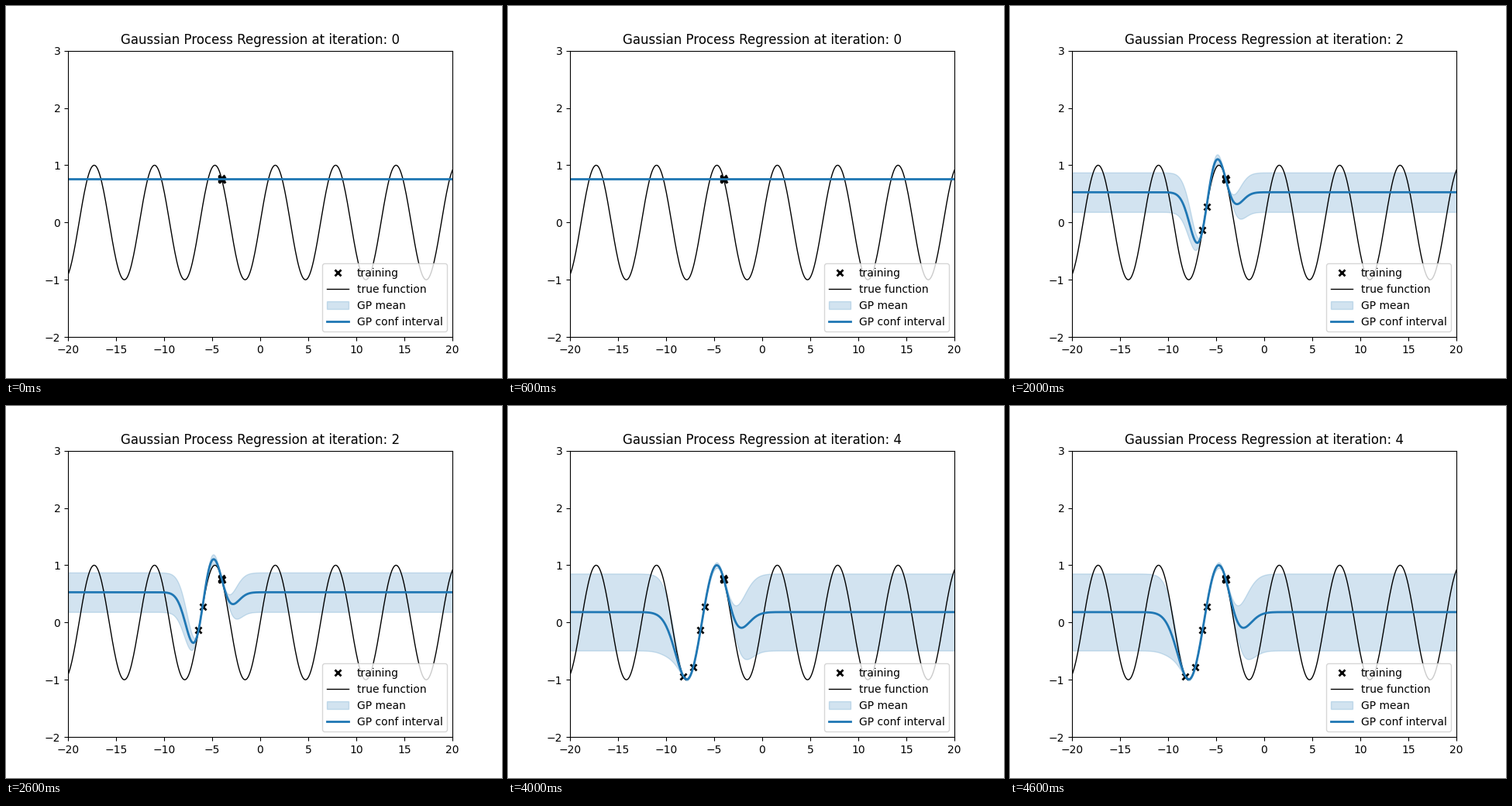
Recreate the animation shown at these times as a matplotlib script. Size 640 by 480 pixels, loop 5000 ms.

```python
import matplotlib.pyplot as plt
import numpy as np
from matplotlib.animation import FuncAnimation

# Four tightly packed starting samples, then one new sample per iteration
START = -4 + np.array([-0.02, -0.007, 0.007, 0.02])
ADDED = np.array([-6.0, -6.42, -7.17, -8.2])
LENGTH_SCALES = [1e-4, 0.8, 0.99, 1.26, 1.32]
NOISE = 3e-5

grid = np.linspace(-20, 20, 400)


def rbf(a, b, scale):
    return np.exp(-0.5 * ((a[:, None] - b[None, :]) / scale) ** 2)


def gp_predict(x, y, scale):
    """Posterior mean and deviation of a GP fitted to normalised targets."""
    mu, sd = y.mean(), y.std()
    gram = rbf(x, x, scale) + NOISE * np.eye(len(x))
    cross = rbf(grid, x, scale)
    mean = cross @ np.linalg.solve(gram, (y - mu) / sd)
    var = 1 - np.sum(cross * np.linalg.solve(gram, cross.T).T, axis=1)
    return mu + sd * mean, sd * np.sqrt(np.clip(var, 0, None))


fig, ax = plt.subplots(figsize=(6.4, 4.8), dpi=100)
points, = ax.plot([], [], "kx", mew=2, label="training")
ax.plot(grid, np.sin(grid), "k", lw=1, label="true function")
band = ax.fill_between(grid, grid * 0, grid * 0, color="C0", alpha=0.2,
                       label="GP mean")
curve, = ax.plot([], [], "C0", lw=2, label="GP conf interval")
ax.set_xlim(-20, 20)
ax.set_ylim(-2, 3)
ax.legend(loc="lower right")
title = ax.set_title("")


def update(step):
    x = np.concatenate([START, ADDED[:step]])
    y = np.sin(x)
    mean, dev = gp_predict(x, y, LENGTH_SCALES[step])
    points.set_data(x, y)
    curve.set_data(grid, mean)
    outline = np.column_stack([
        np.concatenate([grid, grid[::-1]]),
        np.concatenate([mean - dev, (mean + dev)[::-1]]),
    ])
    band.set_verts([outline])
    title.set_text(f"Gaussian Process Regression at iteration: {step}")
    return points, curve, band, title


anim = FuncAnimation(fig, update, frames=len(LENGTH_SCALES), interval=1000,
                     repeat=True, repeat_delay=0, blit=False)
plt.show()
```
